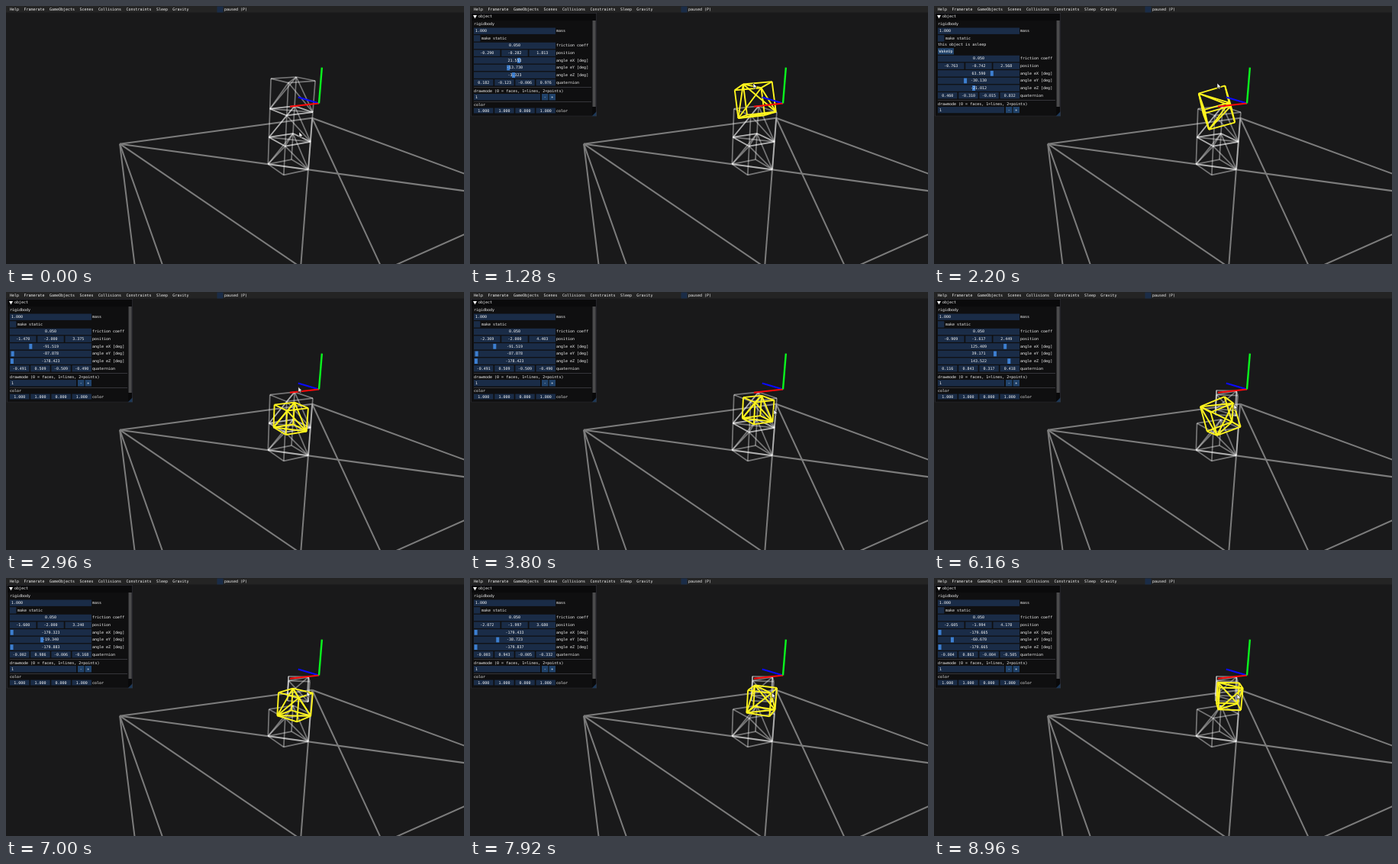
These frames come from a looping animation (600x338 px, 9000 ms). An HTML page with a canvas:

```html
<!DOCTYPE html>
<html lang="en">
<head>
<meta charset="utf-8">
<title>Rigid body sandbox</title>
<style>
  html, body { margin: 0; width: 100%; height: 100%; overflow: hidden; background: #19191a; }
  canvas { display: block; }
</style>
</head>
<body>
<canvas id="stage" width="600" height="338"></canvas>
<script>
const ctx = document.getElementById('stage').getContext('2d');
const LOOP = 9000, STEP = 40, ROW = 9.65, FLOOR = -2;
const GREY = 'rgba(255,255,255,.4)', YELLOW = '#fff51e', WHITE = '#f4f4f4';
const FRAME = '#1a2c47', BUTTON = '#20426a', GRAB = '#3d7fd0', RULE = '#45454d';
const PICK_TOP = 600, PICK_MIDDLE = 4480, NAP = 200;
const UPRIGHT = [0, 0, 0, 1];

const lean = { pos: [-.763, -.742, 2.568], q: [.46, -.31, -.015, .832] };
const topKeys = [
  { t: 900, pos: [0, 0, 1.35], q: UPRIGHT },
  { t: 1900, ...lean },
  { t: 2300, ...lean },
  { t: 3800, pos: [-2.369, FLOOR, 4.403], q: [-.491, .509, -.509, -.49] },
  { t: 4320, pos: [-3.28, FLOOR, 5.33], q: [-.333, .623, -.624, -.332] }
];
const middleKeys = [
  { t: 4600, pos: [0, -1, 1.35], q: UPRIGHT },
  { t: 4920, pos: [-.069, -1.042, 1.375], q: [-.002, .085, .001, .996] },
  { t: 6160, pos: [-.909, -1.617, 2.449], q: [.116, .843, .317, .418] },
  { t: 7000, pos: [-1.6, FLOOR, 3.24], q: [-.002, .986, -.006, -.168] },
  { t: 8960, pos: [-2.605, -1.994, 4.178], q: [-.004, .863, -.004, -.505] }
];
const bottomKeys = [{ t: 0, pos: [0, FLOOR, 1.35], q: UPRIGHT }];
const mouseKeys = [
  { t: 0, pos: [384, 165] }, { t: PICK_TOP, pos: [371, 101] }, { t: 2300, pos: [371, 101] },
  { t: 3800, pos: [398, 154] }, { t: 4920, pos: [391, 145] }, { t: 8960, pos: [397, 152] }
];

// Corner bits: 1 = +x, 2 = +y, 4 = +z
const corners = [...Array(8).keys()].map(i => [1, 2, 4].map(bit => i & bit ? .5 : -.5));
const pairs = corners.flatMap((_, i) => corners.map((_, j) => [i, j]).slice(i + 1));
const differing = ([i, j]) => corners[i].filter((v, k) => v !== corners[j][k]).length;
const isNegative = c => c[0] * c[1] * c[2] < 0;
const edges = pairs.filter(p => differing(p) === 1);
const cubeLines = edges.concat(pairs.filter(p => differing(p) === 2 && isNegative(corners[p[0]])));
const groundLines = edges.concat([[7, 4], [7, 2], [6, 0]]);

const mix = (a, b, f) => a.map((v, k) => v + (b[k] - v) * f);

// Neighbouring keys and the share of the way between them
function span(keys, t) {
  const b = keys.find(k => k.t > t) || keys[keys.length - 1];
  const a = keys[Math.max(0, keys.indexOf(b) - 1)];
  const f = b.t === a.t ? 0 : Math.max(0, Math.min(1, (t - a.t) / (b.t - a.t)));
  return [a, b, f];
}

function pose(keys, t) {
  const [a, b, f] = span(keys, t);
  // A falling body settles early, then slides
  const falling = b.pos[1] === FLOOR && a.pos[1] > FLOOR;
  const turn = falling ? Math.min(1, 3 * f) : f;
  const pos = mix(a.pos, b.pos, f);
  pos[1] = a.pos[1] + (b.pos[1] - a.pos[1]) * (falling ? turn * turn : f);
  const dot = a.q.reduce((sum, v, k) => sum + v * b.q[k], 0);
  const q = mix(a.q, b.q.map(v => dot < 0 ? -v : v), turn);
  const len = Math.hypot(...q) * (dot < 0 && turn === 1 ? -1 : 1);
  return { pos, q: q.map(v => v / len) };
}

function project([x, y, z]) {
  const w = 1 - .0473 * x - .0347 * y + .0956 * z;
  return [(410 - 55.7 * x - 10.5 * y + 9.37 * z) / w, (127.5 - 2 * x - 49.6 * y + 3.43 * z) / w];
}

function rotate([x, y, z, w], [a, b, c]) {
  const u = 2 * (y * c - z * b), v = 2 * (z * a - x * c), n = 2 * (x * b - y * a);
  return [a + w * u + y * n - z * v, b + w * v + z * u - x * n, c + w * n + x * v - y * u];
}

function euler([x, y, z, w]) {
  return [
    Math.atan2(2 * (w * x + y * z), 1 - 2 * (x * x + y * y)),
    Math.asin(Math.max(-1, Math.min(1, 2 * (w * y - z * x)))),
    Math.atan2(2 * (w * z + x * y), 1 - 2 * (y * y + z * z))
  ].map(r => r * 180 / Math.PI);
}

function line(a, b, color, width) {
  ctx.strokeStyle = color;
  ctx.lineWidth = width;
  ctx.beginPath();
  ctx.moveTo(...a);
  ctx.lineTo(...b);
  ctx.stroke();
}

function rect(x, y, w, h, color) {
  ctx.fillStyle = color;
  ctx.fillRect(x, y, w, h);
}

function shape(points, color) {
  ctx.fillStyle = color;
  ctx.beginPath();
  points.forEach(p => ctx.lineTo(...p));
  ctx.closePath();
  ctx.fill();
}

function clip(x, y, w, h) {
  ctx.save();
  ctx.beginPath();
  ctx.rect(x, y, w, h);
  ctx.clip();
}

function text(s, x, y, align = 'left') {
  ctx.fillStyle = WHITE;
  ctx.textAlign = align;
  ctx.fillText(s, x, y);
}

function box({ pos, q }, size, lines, color, width) {
  const pts = corners.map(c => project(rotate(q, c).map((v, k) => v * size + pos[k])));
  for (const [i, j] of lines) line(pts[i], pts[j], color, width);
}

function scene(bodies, picked) {
  box({ pos: [0, -7.5, 1.35], q: UPRIGHT }, 10, groundLines, '#7c7c7c', 2);
  for (const b of bodies) if (b !== picked) box(b, 1, cubeLines, GREY, 1.7);
  if (picked) box(picked, 1, cubeLines, YELLOW, 1.9);
  const origin = project([0, 0, 0]);
  line(origin, project([0, 0, 1]), '#0a0aff', 2);
  line(origin, project([1, 0, 0]), '#ff0a0a', 2);
  line(origin, project([0, 1, 0]), '#0af51e', 2.4);
}

function menu() {
  rect(0, 0, 600, 8.5, '#242424');
  let x = 5;
  for (const name of 'Help Framerate GameObjects Scenes Collisions Constraints Sleep Gravity'.split(' ')) {
    text(name, x, 4.5);
    x += ctx.measureText(name).width + 6.4;
  }
  rect(276.5, .5, 8, 8, FRAME);
  text('paused (P)', 286, 4.5);
}

function field(x, y, w, s, align, color = FRAME) {
  rect(x, y - 4.2, w, 8.4, color);
  text(s, align === 'center' ? x + w / 2 : x + 2, y, align);
}

function fields(values, y, label) {
  const gap = 1.7, w = (107 + gap) / values.length - gap;
  values.forEach((v, i) => field(5 + i * (w + gap), y, w, v.toFixed(3), 'center'));
  text(label, 113, y);
}

function slider(value, range, y, label) {
  rect(5, y - 4.2, 107, 8.4, FRAME);
  rect(56 + value / range * 50.5, y - 3.4, 4, 6.8, GRAB);
  text(value.toFixed(3), 58.5, y, 'center');
  text(label, 113, y);
}

function panel({ pos, q }, asleep) {
  clip(1, 9, 165, 135.5);
  rect(1, 9, 165, 135.5, '#0f0f10');
  rect(1, 9, 165, 10, '#0a0a0b');
  shape([[4, 12], [9, 12], [6.5, 16.5]], WHITE);
  text('object', 11, 14);
  rect(160, 19, 5.5, 125, '#09090a');
  rect(160.5, 19, 4.2, 113, '#4b4b4c');

  clip(1, 19, 159, 121.5);
  let y = 24;
  const next = (gap = ROW) => y += gap;
  text('rigidbody', 5, y);
  field(5, next(8.7), 107, '1.000');
  text('mass', 113, y);
  rect(5, next() - 4.2, 8.4, 8.4, FRAME);
  text('make static', 15, y);
  if (asleep) {
    text('this object is asleep', 5, next(8.6));
    field(5, next(8.4), 21, 'WakeUp', 'center', BUTTON);
  }
  fields([.05], next(), 'friction coeff');
  fields(pos, next(), 'position');
  euler(q).forEach((a, i) => slider(a, i === 1 ? 90 : 180, next(), `angle e${'XYZ'[i]} [deg]`));
  fields(q, next(), 'quaternion');
  rect(5, next(6), 154, .7, RULE);
  text('drawmode (0 = faces, 1=lines, 2=points)', 5, next(5));
  field(5, next(8), 87, '1');
  field(94, y, 8.4, '-', 'center', BUTTON);
  field(103.6, y, 8.4, '+', 'center', BUTTON);
  rect(5, next(6), 154, .7, RULE);
  text('color', 5, next(4.2));
  fields([1, 1, 0, 1], next(8.3), 'color');
  ctx.restore();

  shape([[166, 138], [166, 144.5], [159.5, 144.5]], '#1c3859');
  ctx.strokeStyle = '#34343b';
  ctx.lineWidth = .7;
  ctx.strokeRect(1.3, 9.3, 164.4, 134.9);
  ctx.restore();
}

function cursor([x, y]) {
  const arrow = [[0, 0], [0, 7], [1.6, 5.6], [2.8, 8], [3.9, 7.4], [2.8, 5.2], [4.9, 5]];
  shape(arrow.map(([a, b]) => [x + a, y + b]), '#fff');
  ctx.strokeStyle = '#111';
  ctx.lineWidth = .6;
  ctx.stroke();
}

function draw(now) {
  const t = Math.floor(now % LOOP / STEP) * STEP;
  ctx.font = '5px "DejaVu Sans Mono", monospace';
  ctx.textBaseline = 'middle';
  rect(0, 0, 600, 338, '#19191a');

  const bodies = [topKeys, middleKeys, bottomKeys].map(keys => pose(keys, t));
  const index = t < PICK_TOP ? -1 : t < PICK_MIDDLE ? 0 : 1;
  const picked = bodies[index];
  scene(bodies, picked);
  menu();
  if (picked) {
    const before = pose(index ? middleKeys : topKeys, t - NAP);
    panel(picked, picked.pos.every((v, k) => v === before.pos[k]));
  }
  const [a, b, f] = span(mouseKeys, t);
  cursor(mix(a.pos, b.pos, f));
}

const start = performance.now();
function tick() {
  draw(performance.now() - start);
  requestAnimationFrame(tick);
}
tick();
</script>
</body>
</html>
```
